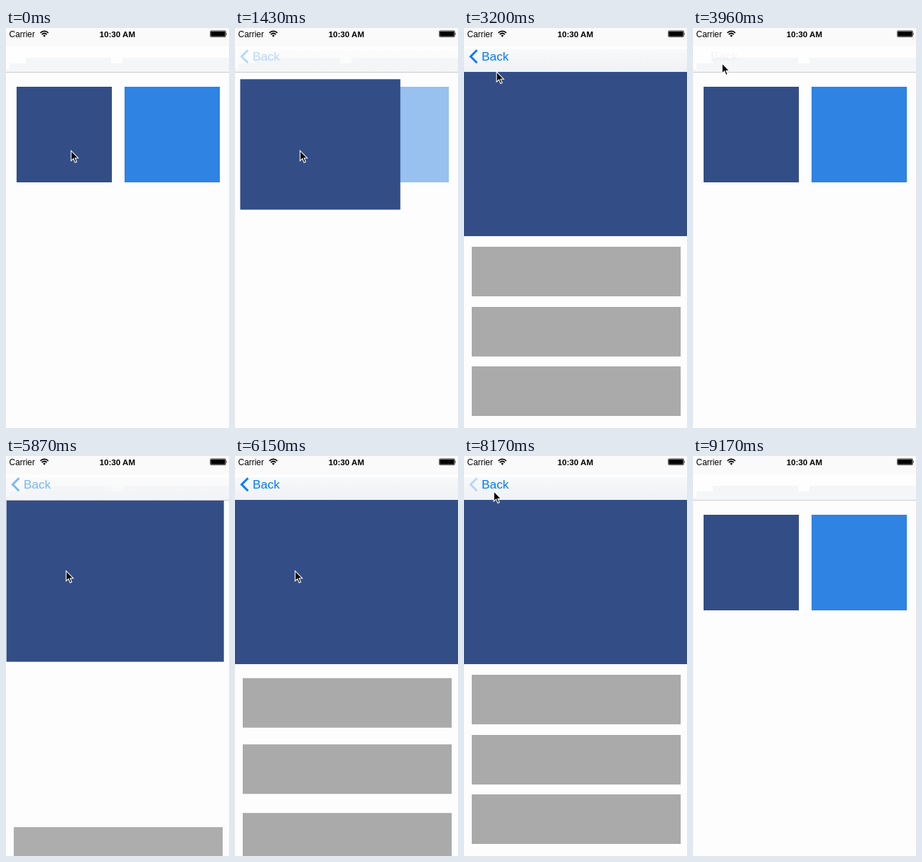
These frames come from a looping animation (316x565 px, 9760 ms). An HTML page:

```html
<!DOCTYPE html>
<html lang="en">
<head>
<meta charset="utf-8">
<title>Zoom transition</title>
<style>
  html, body { margin: 0; width: 100%; height: 100%; overflow: hidden; background: #fdfdfd; }
  svg { display: block; width: 316px; height: 565px; }
  text { font-family: "Liberation Sans", Arial, sans-serif; }
</style>
</head>
<body>
<svg viewBox="0 0 316 565">
  <defs>
    <linearGradient id="barFill" x1="0" y1="0" x2="0" y2="1">
      <stop offset="0" stop-color="#f8f9fa"/>
      <stop offset="1" stop-color="#eff1f4"/>
    </linearGradient>
  </defs>
  <rect width="316" height="565" fill="#fdfdfd"/>
  <rect width="316" height="26" fill="#fafafa"/>
  <rect y="26" width="316" height="36" fill="#fefefe"/>
  <path d="M0 62V58H5V50H28V42H149V50H165V42H316V62Z" fill="#f5f6f7"/>
  <rect id="bar" y="30" width="316" height="32" fill="url(#barFill)"/>
  <rect y="62" width="316" height="1" fill="#cacbcd"/>

  <g id="status">
    <text x="4.6" y="12.6" font-size="11.9">Carrier</text>
    <text x="132.6" y="12.6" font-size="11.6" font-weight="bold">10:30 AM</text>
    <g fill="none" stroke="#000" stroke-width="1.7">
      <path d="M48.6 6.9Q54.3 1.7 60 6.9"/>
      <path d="M50.7 9.1Q54.3 5.9 57.9 9.1"/>
    </g>
    <path d="M52.4 10.7Q54.3 9 56.2 10.7L54.3 12.7Z"/>
    <rect x="289.4" y="3.9" width="22" height="8.7" rx="1.4" fill="#fafafa" stroke="#000" stroke-width=".7"/>
    <rect x="290.2" y="4.7" width="20.4" height="7.1" rx=".7"/>
    <path d="M312.2 6.7Q313.8 8.2 312.2 9.8Z"/>
  </g>

  <rect id="light" x="168" y="83" width="135" height="135" fill="#2f83e3"/>
  <g id="blocks" fill="#aaa">
    <rect x="11" width="296" height="70"/>
    <rect x="11" width="296" height="70"/>
    <rect x="11" width="296" height="70"/>
  </g>
  <rect id="panel" fill="#334e87"/>

  <path id="chevron" d="M18.4 31.3L9.4 40.3L18.4 49.3" fill="none" stroke="#007aff" stroke-width="3"/>
  <text id="back" x="25" y="46" font-size="17.3" fill="#007aff">Back</text>
  <path id="cursor" d="M1.2 1.4V15.6L4.5 12.5L6.9 18L9.2 17L6.9 11.7H11.3Z" stroke="#fff" stroke-width="1.1"/>
</svg>
<script>
const LOOP = 9760;
const ZOOM = 250;
const RISE = 507;
const REST = [309, 394, 478];
const DELAY = [0, 35, 72];
const SMALL = [15, 83, 135, 135];
const LARGE = [0, 62, 316, 232];

// open and close times, start lag, and what is left of the label after closing
const VISITS = [
  { open: 1250, close: 3680, lag: 55, rest: 0.05 },
  { open: 5640, close: 8170, lag: 18, rest: 0 }
];

// pointer moves: start, end, from, to
const MOVES = [
  [2780, 3320, [91, 172], [40, 48.5]],
  [4440, 4920, [40, 48.5], [84, 161]],
  [7280, 7690, [84, 161], [41, 48.5]],
  [8630, 9170, [41, 48.5], [306, 566]]
];

const $ = id => document.getElementById(id);
const [bar, light, panel, chevron, back, cursor] =
  ["bar", "light", "panel", "chevron", "back", "cursor"].map($);
const blocks = $("blocks");

const clamp = v => Math.min(1, Math.max(0, v));
const mix = (a, b, p) => a + (b - a) * p;
const ease = p => p < 0.5 ? 2 * p * p : 1 - 2 * (1 - p) ** 2;
const set = (el, attrs) => {
  for (const k in attrs) el.setAttribute(k, attrs[k]);
};

// damped spring, ratio 0.8, falling from 1 to 0
function spring(ms) {
  if (ms <= 0) return 1;
  const a = 0.0048 * ms;
  const k = 4 / 3;
  return Math.exp(-k * a) * (Math.cos(a) + k * Math.sin(a));
}

function drawCursor(t) {
  let pos = MOVES[0][2];
  for (const [start, end, from, to] of MOVES) {
    if (t < start) break;
    const p = ease(clamp((t - start) / (end - start)));
    pos = from.map((v, i) => mix(v, to[i], p));
  }
  set(cursor, { transform: `translate(${pos})`, opacity: t < 9170 ? 1 : 0 });
}

function draw(t) {
  const v = VISITS.findLast(x => t >= x.open) || { open: LOOP, close: LOOP, lag: 0, rest: 0 };
  const age = t - v.open - v.lag;
  const closing = t >= v.close;
  const left = 1 - ease(clamp((t - v.close) / ZOOM));
  const p = closing ? left : ease(clamp(age / ZOOM));
  const fade = closing ? left : clamp((age - 30) / 350);

  const [x, y, width, height] = SMALL.map((a, i) => mix(a, LARGE[i], p));
  set(panel, { x, y, width, height });
  set(light, { opacity: 1 - p });
  set(bar, { opacity: fade });
  set(chevron, { opacity: closing ? fade * 0.25 : fade });
  set(back, { opacity: closing ? Math.max(fade, v.rest) : fade });
  set(back, { fill: closing && fade < v.rest ? "#555" : "#007aff" });

  set(blocks, { opacity: p });
  [...blocks.children].forEach((el, i) => {
    const drop = closing ? 0 : RISE * spring(age - DELAY[i]);
    set(el, { y: REST[i] + drop });
  });
  drawCursor(t);
}

const begin = performance.now();
function tick() {
  draw((performance.now() - begin) % LOOP);
  requestAnimationFrame(tick);
}
tick();
</script>
</body>
</html>
```
